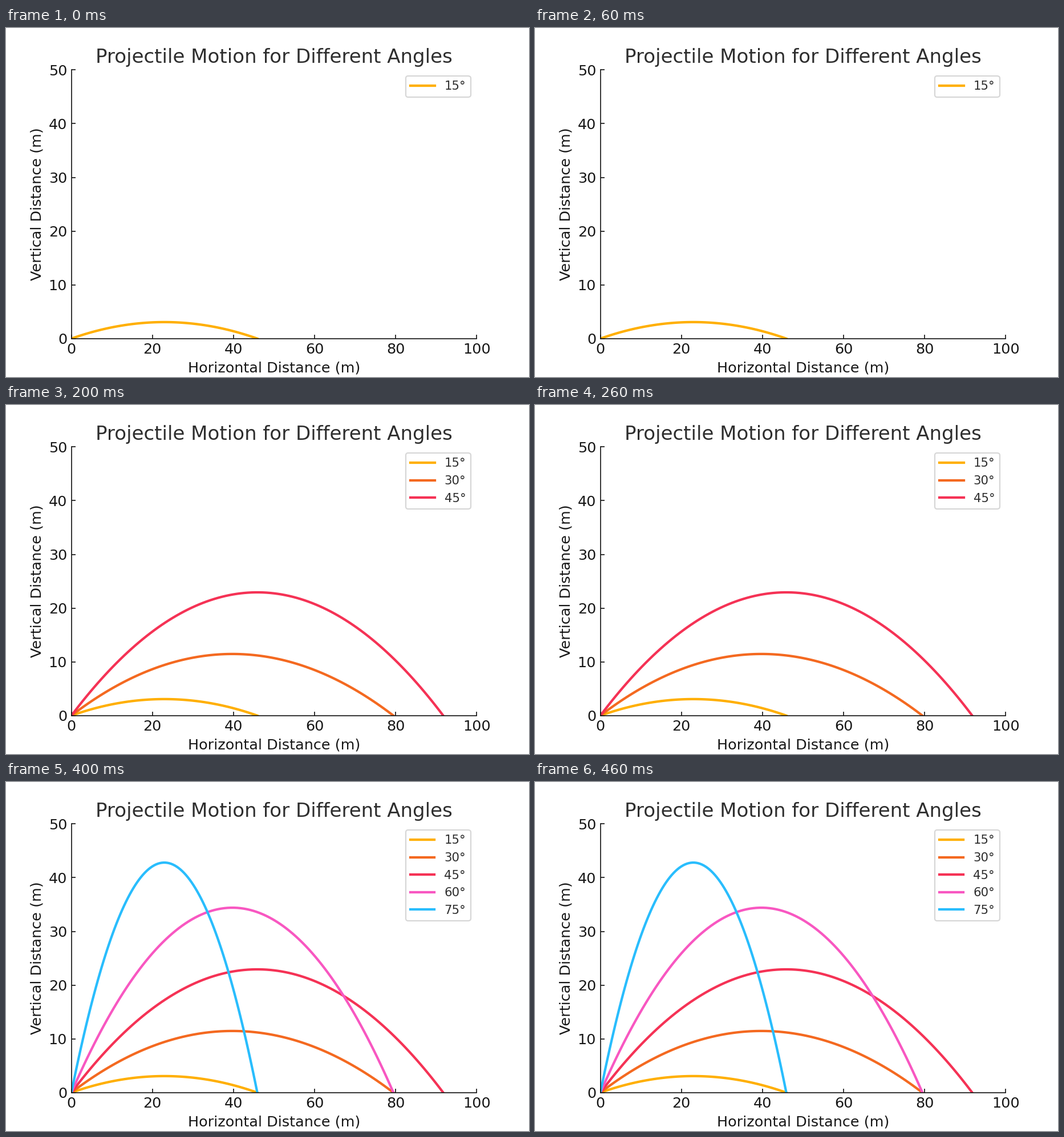
Recreate the animation shown at these times as a matplotlib script. Size 917 by 611 pixels, loop 500 ms.

```python
import numpy as np
import matplotlib.pyplot as plt
from matplotlib.animation import FuncAnimation

WIDTH, HEIGHT, DPI = 917, 611, 152.8
SPEED, GRAVITY = 30, 9.81
ANGLES = [15, 30, 45, 60, 75]
COLORS = ["#FFAF00", "#F46920", "#F53255", "#F857C1", "#29BDFD"]
INK, SOFT_INK = "#161616", "#2e2e2e"

plt.rcParams.update({
    "font.family": "DejaVu Sans",
    "font.size": 12,
    "text.color": SOFT_INK,
    "axes.titlesize": 16,
    "axes.labelcolor": INK,
    "axes.edgecolor": INK,
    "axes.spines.top": False,
    "axes.spines.right": False,
    "xtick.color": INK,
    "ytick.color": INK,
    "xtick.direction": "in",
    "ytick.direction": "in",
    "lines.linewidth": 2,
    "legend.fontsize": 10,
})


def trajectory(angle):
    """Points of a flight from launch to landing."""
    theta = np.radians(angle)
    t = np.linspace(0, 2 * SPEED * np.sin(theta) / GRAVITY, 100)
    x = SPEED * np.cos(theta) * t
    y = SPEED * np.sin(theta) * t - GRAVITY * t**2 / 2
    return x, y


# The tiny margin keeps the pixel size from being truncated.
fig, ax = plt.subplots(
    figsize=((WIDTH + 1e-6) / DPI, (HEIGHT + 1e-6) / DPI), dpi=DPI)
ax.set(xlim=(0, 100), ylim=(0, 50),
       xticks=range(0, 101, 20), yticks=range(0, 51, 10),
       xlabel="Horizontal Distance (m)", ylabel="Vertical Distance (m)",
       title="Projectile Motion for Different Angles")

curves = [ax.plot(*trajectory(angle), color=color, label=f"{angle}°")[0]
          for angle, color in zip(ANGLES, COLORS)]


def update(frame):
    for i, curve in enumerate(curves):
        curve.set_visible(i <= frame)
    legend = ax.legend(handles=curves[:frame + 1], loc="upper right")
    return [*curves, legend]


anim = FuncAnimation(fig, update, frames=len(ANGLES), interval=100,
                     init_func=lambda: update(0), repeat=True,
                     repeat_delay=0, blit=False)
plt.show()
```
